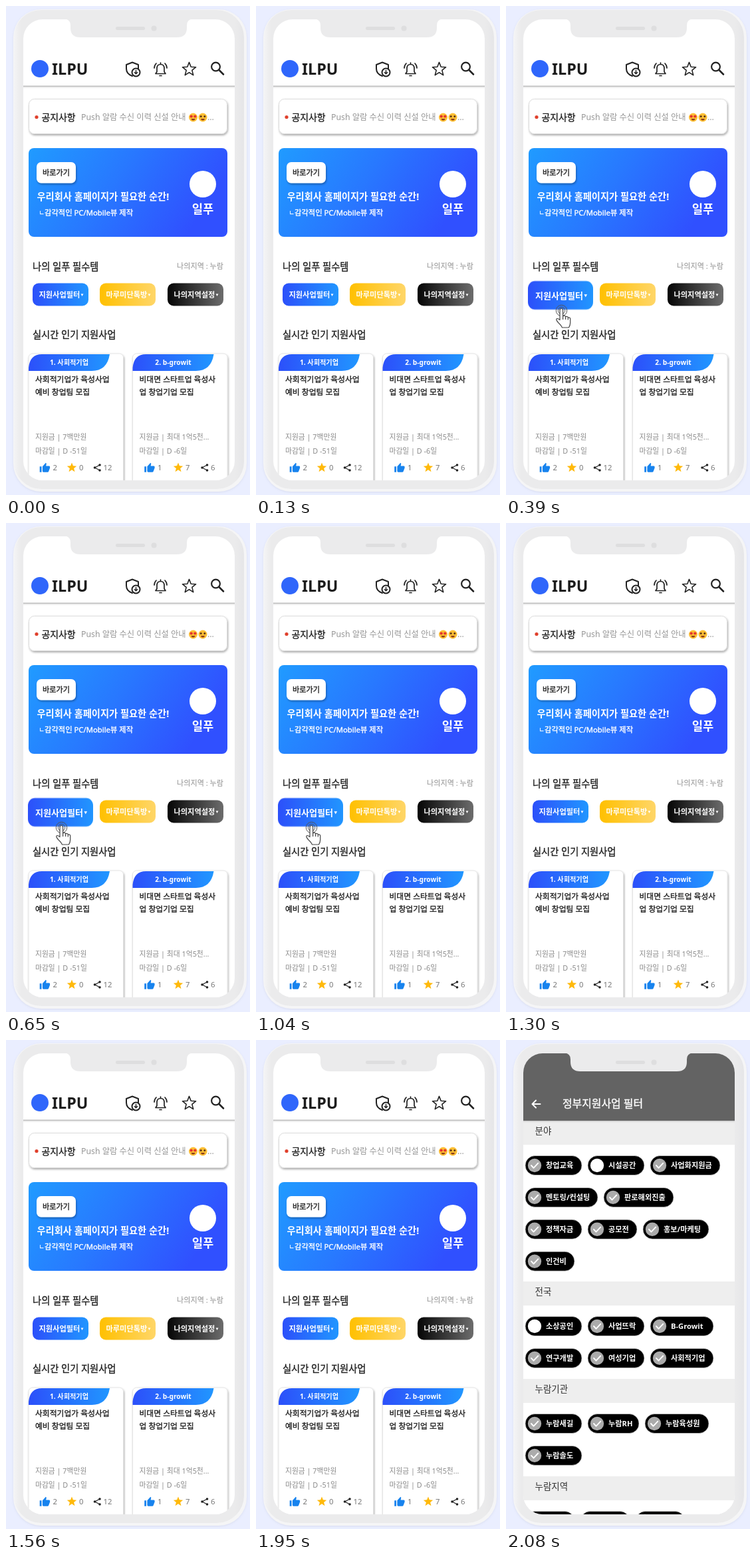
An HTML page that plays this animation: 367x733 px, repeating every 3.25 s.

```html
<!DOCTYPE html>
<html lang="ko">
<head>
<meta charset="utf-8">
<title>Filter tap</title>
<style>
html, body { margin: 0; width: 100%; height: 100%; overflow: hidden; background: #eaeeff; }
svg { display: block; width: 100vw; height: 100vh; }
text { font-family: "Noto Sans", "Noto Sans CJK KR", "Noto Sans CJK", sans-serif; white-space: pre; }
#tapBox, #tapText { transform-box: fill-box; transform-origin: 50% 50%; }
</style>
</head>
<body>
<svg viewBox="0 0 367 733" xmlns="http://www.w3.org/2000/svg">
  <defs>
    <linearGradient id="body">
      <stop offset="0" stop-color="#f4f4f5"/><stop offset=".03" stop-color="#ebebec"/>
      <stop offset=".96" stop-color="#ebebec"/><stop offset="1" stop-color="#e6e6e8"/>
    </linearGradient>
    <linearGradient id="banner" x2="1" y2=".3"><stop stop-color="#209bff"/><stop offset=".5" stop-color="#2878ff"/><stop offset="1" stop-color="#3050ff"/></linearGradient>
    <linearGradient id="blue"><stop stop-color="#2c50fa"/><stop offset="1" stop-color="#2196ff"/></linearGradient>
    <linearGradient id="gold"><stop stop-color="#ffc000"/><stop offset="1" stop-color="#ffd668"/></linearGradient>
    <linearGradient id="dark"><stop stop-color="#050505"/><stop offset="1" stop-color="#6c6c6c"/></linearGradient>
    <filter id="drop" x="-20%" y="-20%" width="140%" height="150%"><feDropShadow dx="1" dy="2" stdDeviation="1.6" flood-opacity=".32"/></filter>
    <filter id="soft" x="-10%" y="-10%" width="120%" height="120%"><feDropShadow dx="0" dy="1" stdDeviation="1.5" flood-color="#8d93b0" flood-opacity=".2"/></filter>
    <clipPath id="screen"><rect x="26" y="20" width="318" height="691" rx="29"/></clipPath>
  </defs>
  <rect width="367" height="733" fill="#eaeeff"/>
  <rect x="11" y="5" width="351" height="723" rx="42" fill="#f5f5f6" filter="url(#soft)"/>
  <rect x="12" y="6" width="346" height="718" rx="41" fill="url(#body)"/>
  <g clip-path="url(#screen)">
    <g id="home"></g>
    <g id="filter" opacity="0"></g>
  </g>
  <path d="M88 19.500Q97 20 97 29V33Q97 47 112 47H257Q272 47 272 33V29Q272 20 281 19.500Z" fill="#ebebec"/>
  <rect x="165" y="31" width="44" height="5" rx="2.500" fill="#dededf"/>
  <circle cx="222.500" cy="33.500" r="4" fill="#dededf"/>
</svg>
<script>
const rect = (x, y, w, h, r, fill, more = '') =>
  `<rect x="${x}" y="${y}" width="${w}" height="${h}" rx="${r}" fill="${fill}" ${more}/>`;
const dot = (x, y, r, fill, more = '') =>
  `<circle cx="${x}" cy="${y}" r="${r}" fill="${fill}" ${more}/>`;
const path = (d, more) => `<path d="${d}" ${more}/>`;
const line = (width, color = '#222') =>
  `fill="none" stroke="${color}" stroke-width="${width}" stroke-linejoin="round" stroke-linecap="round"`;
// y is the vertical middle of the letters; weight 500 is a regular face with a hairline stroke
function text(s, x, y, size, fill, weight = 400, anchor = 'start') {
  const face = weight === 500 ? `font-weight="400" stroke="${fill}" stroke-width=".35"` : `font-weight="${weight}"`;
  return `<text x="${x}" y="${y + size * .4}" font-size="${size}" fill="${fill}" ${face} text-anchor="${anchor}">${s}</text>`;
}
const at = (x, y, scale, body) => `<g transform="translate(${x} ${y}) scale(${scale})">${body}</g>`;

function star(x, y, r, more) {
  const pts = Array.from({ length: 10 }, (_, i) => {
    const a = (i / 5 - .5) * Math.PI, d = i % 2 ? r * .43 : r;
    return `${(x + d * Math.cos(a)).toFixed(2)} ${(y + d * Math.sin(a)).toFixed(2)}`;
  });
  return path(`M${pts.join('L')}Z`, more);
}

function emoji(x, y, eye, size) {
  return dot(x, y, 6.5, '#fdbf35') + dot(x - 2.8, y - 1.5, size, eye) + dot(x + 2.8, y - 1.5, size, eye) +
    path(`M${x - 3} ${y + 2}h6q-.5 2.500-3 2.500t-3-2.500`, 'fill="#8a3c1a"');
}

function button(label, x, fill, id) {
  return rect(x, 415.5, 84, 34, 9, `url(#${fill})`, `id="${id}Box"`) + `<g id="${id}Text">` +
    text(label, x + 9.5, 432.5, 11.2, '#fff', 700) +
    path(`M${x + 72.500} 431.500h4l-2 3.500z`, 'fill="#fff"') + '</g>';
}

// spread pushes the counters apart
function card(x, tab, lines, info, counts, spread) {
  const [like, fav, share] = counts;
  const fx = x + 65 + spread * .7, sx = x + 103.5 + spread;
  return rect(x, 521, 142.5, 210, 6, '#fff', 'stroke="#e4e4e4" filter="url(#drop)"') +
    path(`M${x} 547V542q2-20 20-20H${x + 122}q-4 25-27 25Z`, 'fill="url(#blue)"') +
    text(tab, x + 61, 534, 10.2, '#fff', 700, 'middle') +
    lines.map((s, i) => text(s, x + 10, 559.5 + i * 18.5, 11.8, '#222', 500)).join('') +
    info.map((s, i) => text(s, x + 10, 646 + i * 20.5, 10.8, '#8b8b8b')).join('') +
    at(x + 16 + spread * .2, 684, .7, path('M1 9h4v12H1zM7 9l7-8 1.500 2-1 5H21q2 0 2 2v2l-3 8q-.6 1-2 1H9q-2 0-2-2z', 'fill="#1783ee"')) +
    star(fx, 692, 7.6, 'fill="#ffb90a"') +
    path(`M${sx + 3.500} 688l-7.500 4 7.500 4`, line(1.3)) +
    dot(sx + 3.5, 688, 1.8, '#222') + dot(sx - 4, 692, 1.8, '#222') + dot(sx + 3.5, 696, 1.8, '#222') +
    text(like, x + 36.5 + spread * .2, 691.5, 11.3, '#777') + text(fav, fx + 11, 691.5, 11.3, '#777') +
    text(share, sx + 9, 691.5, 11.3, '#777');
}

const icons =
  path('M190 84.500l9 3.500v7M190 84.500l-9 3.500v6q0 8 9 11', line(2)) +
  dot(195.5, 99.5, 6, '#fff', 'stroke="#222" stroke-width="2"') +
  path('M195.500 96.500v5m-2.200-2l2.200 2.200 2.200-2.200', line(1.5)) +
  path('M225 101.500h15l-2-3v-5q0-6-5.500-6t-5.500 6v5zM232.500 85v2M231 104.500h3M223 93q0-4 3-7M242 93q0-4-3-7', line(1.7)) +
  star(275.5, 95, 10.6, line(1.6)) +
  dot(315.5, 91, 6.4, 'none', 'stroke="#222" stroke-width="2.2"') +
  path('M320.500 96l6.500 6.500', line(2.5));

const hand = '<g id="hand" opacity="0">' +
  dot(83.5, 456.5, 8.2, 'none', 'stroke="#555" stroke-width="1"') +
  dot(83.5, 456.5, 5.2, 'none', 'stroke="#555" stroke-width="1"') +
  path('M81 470V456q0-2.500 2.300-2.500t2.300 2.500v9q3-2 4 .8 3-1.300 3.700 1.200 3.400-.6 3.400 2.500v5q0 4-2.200 7.500h-10q-2-4-6-7.500-3.500-4-2.500-5.500 1.500-1.500 5 1.500zM85.600 465v5M89.600 466v4M93.300 467.500v3',
    'fill="#fff" stroke="#444" stroke-width="1.200" stroke-linejoin="round"') + '</g>';

document.getElementById('home').innerHTML =
  rect(26, 20, 318, 691, 0, '#fff') +
  rect(26, 119.5, 318, 1.5, 0, '#bdbdbd') + rect(26, 121, 318, 2, 0, '#eeeeee') +
  dot(51, 94, 13, '#2f66fb') + text('ILPU', 69, 94, 23.3, '#1c1c1c', 700) + icons +
  rect(34.5, 139.5, 298, 52, 8, '#fff', 'stroke="#dcdcdc" filter="url(#drop)"') +
  dot(46, 166.5, 2.6, '#e0402c') +
  text('공지사항', 53.5, 166.5, 13.9, '#222', 500) +
  text('Push 알람 수신 이력 신설 안내', 113, 166.5, 12.3, '#969696') +
  emoji(281.5, 167, '#e3342f', 2.1) + emoji(296, 167, '#5a3418', 1.5) + text('...', 303, 166.5, 12.3, '#969696') +
  rect(34, 213, 299, 133, 8, 'url(#banner)') +
  rect(46, 234, 59, 31.5, 7, '#fff', 'filter="url(#drop)"') +
  text('바로가기', 75.5, 249.5, 11.2, '#222', 500, 'middle') +
  text('우리회사 홈페이지가 필요한 순간!', 46.5, 285.5, 14.25, '#fff', 600) +
  text('ㄴ', 49.5, 309.5, 9, '#fff', 500) +
  text('감각적인 PC/Mobile뷰 제작', 58, 309, 11.3, '#fff', 500) +
  dot(296, 267, 20, '#fff') + text('일푸', 296, 303.5, 17.8, '#fff', 700, 'middle') +
  text('나의 일푸 필수템', 40, 390, 14.3, '#222', 500) +
  text('나의지역 : 누람', 327, 390, 11.1, '#8f8f8f', 400, 'end') +
  button('마루미단톡방', 141, 'gold', 'chat') + button('나의지역설정', 243, 'dark', 'region') +
  text('실시간 인기 지원사업', 40, 492.5, 14.25, '#222', 500) +
  card(34, '1. 사회적기업', ['사회적기업가 육성사업', '예비 창업팀 모집'], ['지원금 | 7백만원', '마감일 | D -51일'], [2, 0, 12], 0) +
  card(190.5, '2. b-growit', ['비대면 스타트업 육성사', '업 창업기업 모집'], ['지원금 | 최대 1억5천...', '마감일 | D -6일'], [1, 7, 6], 5) +
  button('지원사업필터', 40, 'blue', 'tap') + hand;

// each chip is "label:width"; a leading "!" leaves it unticked
const sections = [
  ['분야', 121, ['창업교육:85 !시설공간:85 사업화지원금:105', '멘토링/컨설팅:109 판로해외진출:105',
    '정책자금:85 공모전:74 홍보/마케팅:99', '인건비:74']],
  ['전국', 362, ['!소상공인:85 사업뜨락:85 B-Growit:95', '연구개발:85 여성기업:85 사회적기업:95']],
  ['누람기관', 508, ['누람새길:85 누람RH:77 누람육성원:96', '누람솔도:85']],
  ['누람지역', 654, ['동부권:74 서부권:74 남부권:74']]
];

function chip(spec, x, y) {
  const off = spec[0] === '!', [label, w] = spec.replace('!', '').split(':');
  return rect(x, y - 14.5, +w, 29, 14.5, '#000', 'stroke="#ddd" stroke-width=".6"') +
    dot(x + 14, y, 10.2, off ? '#fff' : '#ababab') +
    (off ? '' : path(`M${x + 9} ${y}l3.500 3.800 6.800-7.200`, line(1.9, '#fff'))) +
    text(label, x + 31, y, 11.2, '#fff', 700);
}

function section([title, top, rows]) {
  return rect(26, top, 318, 36, 0, '#eeeeee') + text(title, 43.5, top + 15, 13.5, '#333') +
    rows.map((row, i) => {
      let x = 29;
      return row.split(' ').map(spec => {
        const out = chip(spec, x, top + 67 + i * 47.9);
        x += +spec.split(':')[1] + 9;
        return out;
      }).join('');
    }).join('');
}

document.getElementById('filter').innerHTML =
  rect(26, 20, 318, 691, 0, '#fff') + sections.map(section).join('') +
  rect(26, 20, 318, 101, 0, '#636363') + rect(26, 121, 318, 2, 0, '#d8d8d8') +
  path('M51.500 96H39.500m5.500-5.500L39.500 96l5.500 5.500', line(2, '#fff')) +
  text('정부지원사업 필터', 85, 95, 15.9, '#fff', 500);

const LOOP = 3250;

// steps: [start in ms, value], each held until the next
function play(id, prop, steps) {
  const frames = steps.map(([ms, value]) => ({ offset: ms / LOOP, [prop]: value, easing: 'step-end' }));
  frames.push({ offset: 1, [prop]: steps.at(-1)[1] });
  document.getElementById(id).animate(frames, { duration: LOOP, iterations: Infinity });
}

play('tapBox', 'transform', [[0, 'none'], [260, 'translateY(1px) scale(1.167, 1.26)'], [1300, 'none']]);
play('tapText', 'transform', [[0, 'none'], [260, 'translateY(1px) scale(1.167)'], [1300, 'none']]);
play('hand', 'opacity', [[0, 0], [260, 1], [1300, 0]]);
play('filter', 'opacity', [[0, 0], [2080, 1]]);
</script>
</body>
</html>
```
